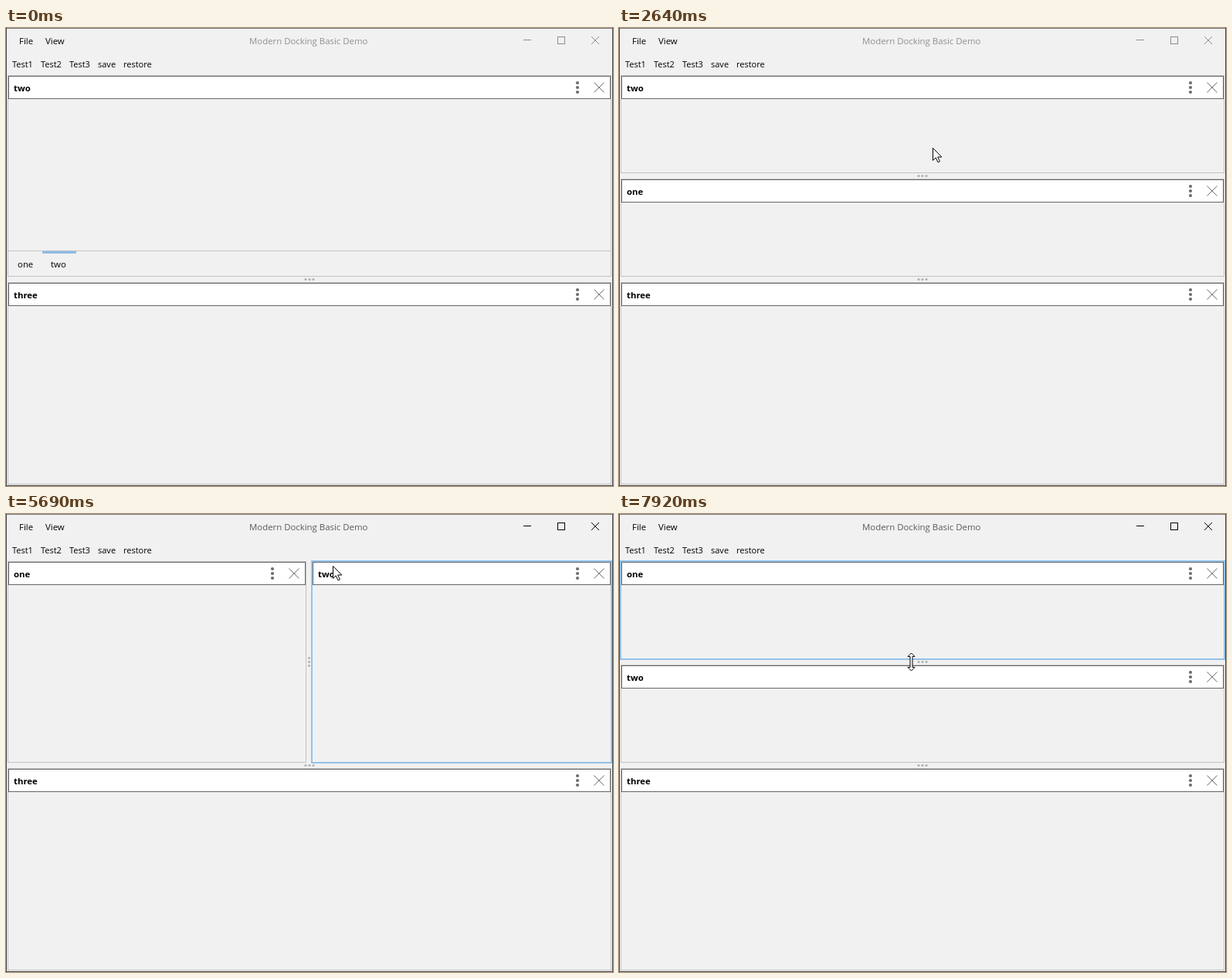
Recreate the animation shown at these times as an HTML page. Size 786 px wide and 593 px high, loop 7.99 s.

```html
<!DOCTYPE html>
<html lang="en">
<head>
<meta charset="utf-8">
<title>Modern Docking Basic Demo</title>
<style>
html, body { margin: 0; width: 100%; height: 100%; overflow: hidden; background: #f1f1f1; }
svg { display: block; }
text { font-family: "Open Sans", "Noto Sans", sans-serif; font-size: 11.4px; white-space: pre; }
.tool { font-size: 11px; }
.bold { font-weight: bold; }
</style>
</head>
<body>
<svg id="stage" width="786" height="593" viewBox="0 0 786 593"></svg>
<script>
const LOOP = 7990;
const BG = '#f1f1f1', EDGE = '#c3c3c3', FOCUS = '#93c3ea', ICON = '#6e6e6e', HOT = '#64abe7';
const stage = document.getElementById('stage');

// pointer track: time, x, y
const TRACK = [
  [20, 398, 566], [140, 384, 290], [270, 367, 110], [410, 367, 110], [990, 346, 83],
  [1410, 346, 83], [1880, 379, 114], [2190, 404, 148], [2340, 406, 155],
  [3000, 406, 155], [3370, 378, 77], [3520, 378, 77], [3890, 406, 157],
  [4310, 423, 214], [4440, 427, 215], [4930, 427, 215], [5590, 423, 67],
  [5720, 423, 67], [6460, 395, 247], [7550, 395, 247], [7800, 382, 172], [7920, 378, 191]
];

// press, drag start, drop, focus back, grab offset, floating size
const DRAGS = [
  { press: 1170, start: 1410, drop: 2640, focus: 2680, dx: 343, dy: 20, w: 788, h: 233 },
  { press: 3520, start: 3560, drop: 4890, focus: 4930, dx: 375, dy: 16, w: 788, h: 133 },
  { press: 5720, start: 5760, drop: 7340, focus: 7360, dx: 29, dy: 5, w: 394, h: 267 }
];

function pointer(t) {
  if (t < TRACK[0][0]) return null;
  let i = TRACK.findIndex(k => k[0] > t);
  if (i < 0) i = TRACK.length;
  const a = TRACK[i - 1], b = TRACK[i] || a;
  const p = b === a ? 0 : (t - a[0]) / (b[0] - a[0]);
  return { x: Math.round(a[1] + (b[1] - a[1]) * p), y: Math.round(a[2] + (b[2] - a[2]) * p) };
}

const fill = (x, y, w, h, c) => `<rect x="${x}" y="${y}" width="${w}" height="${h}" fill="${c}"/>`;
const box = (x, y, w, h, line, c = 'none', s = 1) =>
  `<rect x="${x + s / 2}" y="${y + s / 2}" width="${w - s}" height="${h - s}" fill="${c}" stroke="${line}" stroke-width="${s}"/>`;
const path = (d, line, c = 'none', more = '') => `<path d="${d}" stroke="${line}" fill="${c}" ${more}/>`;
const dot = (x, y, r, c) => `<circle cx="${x}" cy="${y}" r="${r}" fill="${c}"/>`;
const label = (x, y, s, cls = '', c = '#000') => `<text x="${x}" y="${y}" class="${cls}" fill="${c}">${s}</text>`;
const cross = (x, y, r, c) =>
  path(`M${x - r} ${y - r}L${x + r} ${y + r}M${x + r} ${y - r}L${x - r} ${y + r}`, c);

function panel(name, x, y, w, h, focused) {
  const right = x + w - 2, mid = y + 17;
  return fill(x + 1, y + 1, w - 2, h - 2, BG) +
    (focused ? box(x, y, w, h, FOCUS, 'none', 2) : box(x + 1, y + 1, w - 2, h - 2, EDGE)) +
    box(x + 2, y + 2, w - 4, 30, '#666', '#fff') +
    label(x + 9, y + 22, name, 'bold') +
    [-6, 0, 6].map(d => dot(right - 43, mid + d, 2.1, ICON)).join('') +
    cross(right - 15, mid, 6.5, ICON);
}

const grip = (x, y, upright) => [-5, 0, 5].map(d =>
  upright ? dot(x, y + d, 1.6, '#b2b2b2') : dot(x + d, y, 1.6, '#b2b2b2')).join('');

function chrome(active) {
  const c = active ? '#000' : '#8c8c8c';
  return fill(0, 0, 786, 593, BG) +
    label(17, 21, 'File') + label(51, 21, 'View') +
    label(315, 21, 'Modern Docking Basic Demo', '', active ? '#5a5a5a' : '#8f8f8f') +
    fill(670, 15, 10, 1, c) + box(714, 11, 10, 10, c) + cross(763, 16, 5, c) +
    [[8, 'Test1'], [45, 'Test2'], [82, 'Test3'], [119, 'save'], [152, 'restore']]
      .map(([x, s]) => label(x, 51, s, 'tool')).join('');
}

const frame = () => fill(0, 0, 786, 1, '#777') + fill(0, 0, 1, 593, '#444') +
  fill(785, 0, 1, 593, '#444') + fill(0, 592, 786, 1, '#444');

function stacked(top, low, focus) {
  return panel(low, 1, 194, 784, 129, focus === low) +
    panel(top, 1, 60, 784, 129, focus === top) + grip(393, 191.5);
}

function layout(t, p, drag) {
  let s;
  if (drag) {
    s = panel('one', 1, 60, 784, 263);
  } else if (t < 2640) {
    const on = p && p.y < 322;
    s = box(2, 61, 782, 261, EDGE) + panel('two', 1, 60, 784, 230, on) +
      fill(47, 289, 44, 3, '#8dbbe6') + label(15, 310, 'one') + label(58, 310, 'two');
  } else if (t < 4890) {
    s = stacked('two', 'one', t >= 2680 && 'two');
  } else if (t < 7340) {
    s = panel('one', 1, 60, 389, 263) + panel('two', 395, 60, 390, 263, t >= 4930) + grip(392.5, 191.5, true);
  } else {
    const up = t > 7700 && (p.y < 189 || t > 7800);
    s = stacked('one', 'two', t >= 7360 && (up ? 'one' : 'two'));
  }
  return s + panel('three', 1, 328, 784, 264, p && t < 410 && p.y > 329) + grip(393, 325.5);
}

// drop targets: icon square and which part of it lights up
const TARGETS = [
  { id: 'rootN', x: 377, y: 92, part: 'N' }, { id: 'rootW', x: 33, y: 310, part: 'W' },
  { id: 'rootE', x: 721, y: 310, part: 'E' }, { id: 'rootS', x: 377, y: 528, part: 'S' },
  { id: 'N', x: 377, y: 150, part: 'N' }, { id: 'W', x: 337, y: 190, part: 'W' },
  { id: 'C', x: 377, y: 190, part: 'C' }, { id: 'E', x: 417, y: 190, part: 'E' },
  { id: 'S', x: 377, y: 230, part: 'S' }
];

function half(part, x, y, w, h) {
  if (part === 'N') return [x, y, w, Math.floor(h / 2)];
  if (part === 'S') return [x, y + Math.floor(h / 2), w, Math.ceil(h / 2)];
  if (part === 'W') return [x, y, Math.floor(w / 2), h];
  if (part === 'E') return [x + Math.floor(w / 2), y, Math.ceil(w / 2), h];
  return [x, y, w, h];
}

function handles(hit) {
  let s = path('M369.5 142.5h48v32l8 8h32v48h-32l-8 8v32h-48v-32l-8-8h-32v-48h32l8-8z', EDGE, BG);
  for (const k of TARGETS) {
    const lit = half(k.part, k.x, k.y, 33, 33);
    const root = k.id.length > 1;
    if (root) s += box(k.x - 8, k.y - 8, 49, 49, EDGE, BG);
    if (k === hit) s += fill(...lit, HOT);
    if (root) {
      const [x, y, w, h] = lit;
      s += box(x, y, Math.max(w, 17), Math.max(h, 17), '#000');
      continue;
    }
    s += box(k.x, k.y, 33, 33, '#000');
    if (k.part !== 'C') {
      const flat = 'NS'.includes(k.part);
      s += path(flat ? `M${k.x} ${k.y + 16.5}h33` : `M${k.x + 16.5} ${k.y}v33`, '#000', 'none', 'stroke-dasharray="3 3"');
    }
  }
  return s;
}

function overlay(p, hit) {
  const root = hit && hit.id.length > 1;
  const part = hit ? hit.part : p.y < 170 ? 'N' : p.y > 218 ? 'S' : 'C';
  const r = root ? half(part, 1, 60, 784, 532) : half(part, 3, 62, 780, 258);
  return fill(...r, 'rgba(78,128,193,.4)');
}

const ARROW = 'M.5.5v16l3.7-3.6 2.8 6 2.4-1.1-2.7-5.8h5.1z';
const SIZER = 'M0-11.5l4.5 4.5h-3v14h3l-4.5 4.5-4.5-4.5h3v-14h-3z';
const MOVER = (() => {
  const arm = [[0, -11], [4.5, -6.5], [1.5, -6.5], [1.5, -1.5], [6.5, -1.5], [6.5, -4.5]];
  const pts = [];
  for (let q = 0; q < 4; q++)
    for (const a of arm) {
      let [x, y] = a;
      for (let i = 0; i < q; i++) [x, y] = [-y, x];
      pts.push(x + ' ' + y);
    }
  return 'M' + pts.join('L') + 'z';
})();

function cursor(t, p, pressed, drag) {
  const split = !drag && (p.y > 322 && p.y < 329 || t > 7340 && p.y > 188 && p.y < 195);
  const shape = drag ? MOVER : split ? SIZER : ARROW;
  const halo = pressed ? dot(0, 0, 11.5, 'rgba(228,224,72,.85)') : '';
  return `<g transform="translate(${p.x + (split ? .5 : 0)} ${p.y + (split ? .5 : 0)})">` + halo +
    path(shape, drag ? '#4d4b1c' : '#000', drag ? '#f3ee86' : '#fff') + '</g>';
}

function draw(t) {
  const p = pointer(t);
  const held = DRAGS.find(d => t >= d.press && t < d.drop);
  const drag = held && t >= held.start ? held : null;
  const active = t >= 1170 && !DRAGS.some(d => t >= d.start && t < d.focus);
  let s = chrome(active) + layout(t, p, drag);
  if (drag) {
    const hit = TARGETS.find(k => p.x >= k.x && p.x <= k.x + 28 && p.y >= k.y && p.y <= k.y + 32);
    s += frame() + panel('two', p.x - drag.dx, p.y - drag.dy, drag.w, drag.h, true) +
      handles(hit) + overlay(p, hit);
  } else {
    s += frame();
  }
  if (p) s += cursor(t, p, held, drag);
  return s;
}

let last = '';
const begin = performance.now();
function tick() {
  const s = draw((performance.now() - begin) % LOOP);
  if (s !== last) stage.innerHTML = last = s;
  requestAnimationFrame(tick);
}
tick();
</script>
</body>
</html>
```
